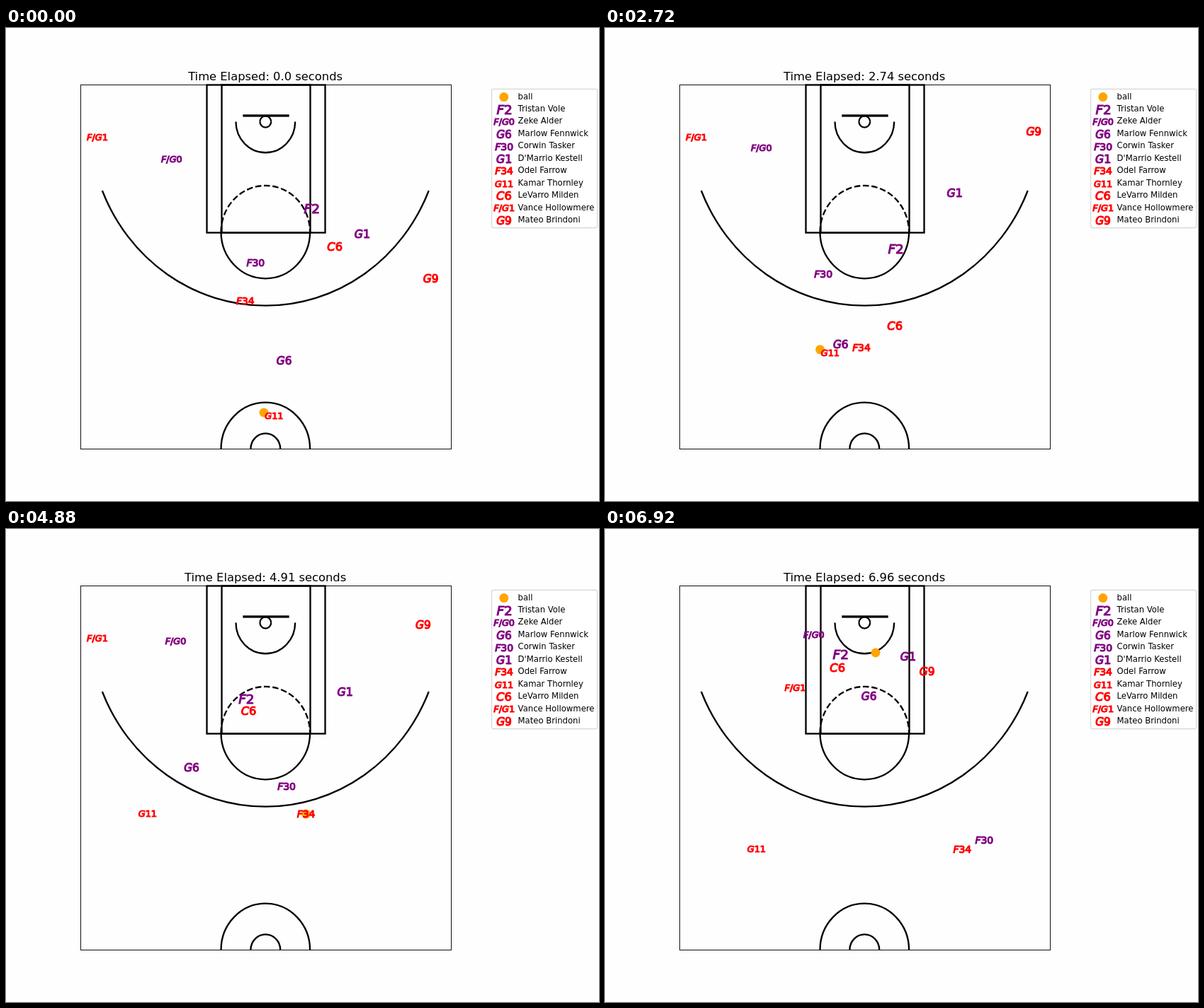
These frames come from a looping animation (837 px wide and 669 px high, 6.96 s). An HTML page:

```html
<!DOCTYPE html>
<html lang="en">
<head>
<meta charset="utf-8">
<title>Half-court play</title>
<style>
  html, body { margin: 0; width: 100%; height: 100%; overflow: hidden; background: #fefefe; }
  svg { display: block; font-family: "DejaVu Sans", sans-serif; }
  #court { fill: none; stroke: #000; stroke-width: 2.33; }
  .mark { stroke-width: 1.16; stroke-miterlimit: 3; }
</style>
</head>
<body>
<svg width="837" height="669" viewBox="0 0 837 669">
  <g id="court"></g>
  <text id="title" x="366.1" y="73.6" font-size="16.33" text-anchor="middle"></text>
  <rect x="685.6" y="86.4" width="149" height="196.2" rx="2.3" fill="#fff" fill-opacity=".8" stroke="#ccc" stroke-opacity=".8" stroke-width="1.16"/>
  <g id="legend" font-size="11.63"></g>
  <g id="actors"></g>
</svg>
<script>
const STEP = 0.04, STEPS = 174, CLOCK_RATE = 1.006;
const END = STEP * (STEPS - 1);
const PT = 83.7 / 72;
const PURPLE = "#800080", RED = "#ff0000", ORANGE = "#ffa500";
const HOOP = { x: 366.3, y: 132.5 };
const SCALE = { x: 1.0465, y: 1.0955 };

const byId = id => document.getElementById(id);

function add(parent, tag, attrs, text = "") {
  const el = document.createElementNS("http://www.w3.org/2000/svg", tag);
  for (const key in attrs) el.setAttribute(key, attrs[key]);
  el.textContent = text;
  return parent.appendChild(el);
}

// Court sizes are in tenths of a foot from the hoop; straight lines sit on pixel centres.
const snap = (axis, v) => Math.round(HOOP[axis] + SCALE[axis] * v) + 0.5;

function drawBox(left, top, right, bottom, attrs = {}) {
  const x = snap("x", left), y = snap("y", top);
  add(byId("court"), "rect", { x, y, width: snap("x", right) - x, height: snap("y", bottom) - y, ...attrs });
}

// Angles run clockwise from the right-hand side.
function drawArc(radius, centerY = 0, from = 0, to = 180, attrs = {}) {
  const rx = radius * SCALE.x, ry = radius * SCALE.y;
  const point = degrees => {
    const a = degrees * Math.PI / 180;
    return `${HOOP.x + rx * Math.cos(a)} ${HOOP.y + SCALE.y * centerY + ry * Math.sin(a)}`;
  };
  add(byId("court"), "path", { d: `M${point(from)}A${rx} ${ry} 0 0 1 ${point(to)}`, ...attrs });
}

function drawCourt() {
  const top = -47.5, freeThrow = 142.5, half = 422.5;
  for (const side of [-220, 220]) drawBox(side, top, side, 92.5);
  for (const side of [60, 80]) drawBox(-side, top, side, freeThrow);
  drawBox(-250, top, 250, half, { "stroke-width": 0.93 });
  drawBox(-30, -8.5, 30, -7.5);
  drawArc(7.5);
  drawArc(7.5, 0, 180, 360);
  drawArc(40);
  drawArc(237.5, 0, 22, 158);
  drawArc(60, freeThrow);
  drawArc(60, freeThrow, 180, 360, { "stroke-dasharray": "8.6 3.7" });
  for (const radius of [20, 60]) drawArc(radius, half, 180, 360);
}

// Letters are oblique, digits and slashes upright; the ink is centred on 0,0.
const pen = document.createElement("canvas").getContext("2d");

function drawLabel(parent, label, color) {
  const runs = label.match(/[A-Z]|[^A-Z]+/g).map(text => {
    const style = /[A-Z]/.test(text) ? "italic" : "normal";
    pen.font = `${style} 100px "DejaVu Sans", sans-serif`;
    return { text, style, box: pen.measureText(text) };
  });
  const last = runs[runs.length - 1].box;
  const advance = runs.reduce((sum, run) => sum + run.box.width, 0);
  const left = -runs[0].box.actualBoundingBoxLeft;
  const right = advance - last.width + last.actualBoundingBoxRight;
  const top = Math.max(...runs.map(run => run.box.actualBoundingBoxAscent));
  const bottom = Math.max(...runs.map(run => run.box.actualBoundingBoxDescent));
  const scale = Math.sqrt(150 * label.length) * PT / (right - left);
  const text = add(parent, "text", {
    class: "mark", fill: color, stroke: color, "font-size": 100 * scale,
    x: -scale * (left + right) / 2, y: scale * (top - bottom) / 2
  });
  for (const run of runs) add(text, "tspan", { "font-style": run.style }, run.text);
}

function drawMarker(parent, label, color) {
  const group = add(parent, "g", {});
  if (label) drawLabel(group, label, color);
  else add(group, "circle", { r: 6.5, fill: color });
  return group;
}

const place = (el, [x, y]) => el.setAttribute("transform", `translate(${x.toFixed(2)} ${y.toFixed(2)})`);
const clamp = v => Math.min(1, Math.max(0, v));
const mix = (a, b, u) => a.map((v, i) => v + (b[i] - v) * u);
const shift = (a, b) => a.map((v, i) => v + b[i]);

// Smooth route through points that are evenly spaced in time.
function route(points, start = 0) {
  const last = points.length - 1;
  const tangent = (i, axis) => {
    const a = Math.max(i - 1, 0), b = Math.min(i + 1, last);
    return (points[b][axis] - points[a][axis]) / (b - a);
  };
  return t => {
    const pos = clamp((t - start) / (END - start)) * last;
    const i = Math.min(Math.floor(pos), last - 1), u = pos - i;
    return [0, 1].map(axis => {
      const a = points[i][axis], rate = points[i + 1][axis] - a;
      const bend = (tangent(i, axis) - rate) * (1 - u) - (tangent(i + 1, axis) - rate) * u;
      return a + rate * u + u * (1 - u) * bend;
    });
  };
}

const guard = route([[378, 548], [374, 530], [269.5, 410.5], [192, 406], [213.5, 452.5]]);
const shooter = route([[337.5, 385.5], [341, 427], [382, 458.5], [434, 398], [504, 452.5]]);

// Dribble, pass, hold, shot, then the bounce off the rim.
function ballAt(t) {
  const dribble = shift(guard(t), [-14, -4]);
  if (t < 4.56) return mix(dribble, shooter(t), clamp((t - 3.96) / 0.6));
  const rim = [HOOP.x, HOOP.y];
  if (t < 6.14) return mix(shooter(Math.min(t, 5.08)), rim, clamp((t - 5.08) / 1.06));
  return mix(rim, [382, 175], (t - 6.14) / (END - 6.14));
}

const actors = [];

function addActor(label, name, color, positionAt) {
  const row = 17.46 * actors.length;
  place(drawMarker(byId("legend"), label, color), [702.8, 97.6 + row]);
  add(byId("legend"), "text", { x: 722.6, y: 100.5 + row }, name);
  actors.push({ el: drawMarker(byId("actors"), label, color), positionAt });
}

function addActors() {
  addActor("", "ball", ORANGE, ballAt);
  addActor("F2", "Tristan Vole", PURPLE,
    route([[431, 255], [417, 311], [398, 299.5], [330, 228], [332, 177]]));
  addActor("F/G0", "Zeke Alder", PURPLE,
    route([[233.5, 186], [230, 173], [217.5, 168], [246, 157], [294.5, 149.5]]));
  addActor("G6", "Marlow Fennwick", PURPLE,
    route([[392.5, 470], [370, 492], [304, 404], [264, 322], [372.5, 236]]));
  addActor("F30", "Corwin Tasker", PURPLE,
    route([[352, 331.5], [341, 350], [300, 347.5], [419, 371], [535, 439.5]]));
  addActor("G1", "D'Marrio Kestell", PURPLE,
    route([[502.5, 291], [501, 241], [486.5, 231.5], [474, 227], [427.5, 180]]));
  addActor("F34", "Odel Farrow", RED, shooter);
  addActor("G11", "Kamar Thornley", RED, guard);
  addActor("C6", "LeVarro Milden", RED,
    route([[464, 309], [421, 409], [397, 401], [334, 233], [328, 196]]));
  addActor("F/G1", "Vance Hollowmere", RED,
    route([[128.5, 154.5], [199, 178], [268, 224.5]], 5));
  addActor("G9", "Mateo Brindoni", RED,
    route([[599.5, 354], [612, 197], [597, 127], [579, 142], [454.5, 201]]));
}

function formatSeconds(value) {
  const rounded = Math.round(value * 100) / 100;
  return Number.isInteger(rounded) ? rounded.toFixed(1) : String(rounded);
}

function render(seconds) {
  const t = Math.floor(seconds / STEP + 1e-6) % STEPS * STEP;
  byId("title").textContent = `Time Elapsed: ${formatSeconds(t * CLOCK_RATE)} seconds`;
  for (const { el, positionAt } of actors) place(el, positionAt(t));
}

let start;
function tick(now) {
  start ??= now;
  render((now - start) / 1000);
  requestAnimationFrame(tick);
}

drawCourt();
addActors();
render(0);
requestAnimationFrame(tick);
</script>
</body>
</html>
```
